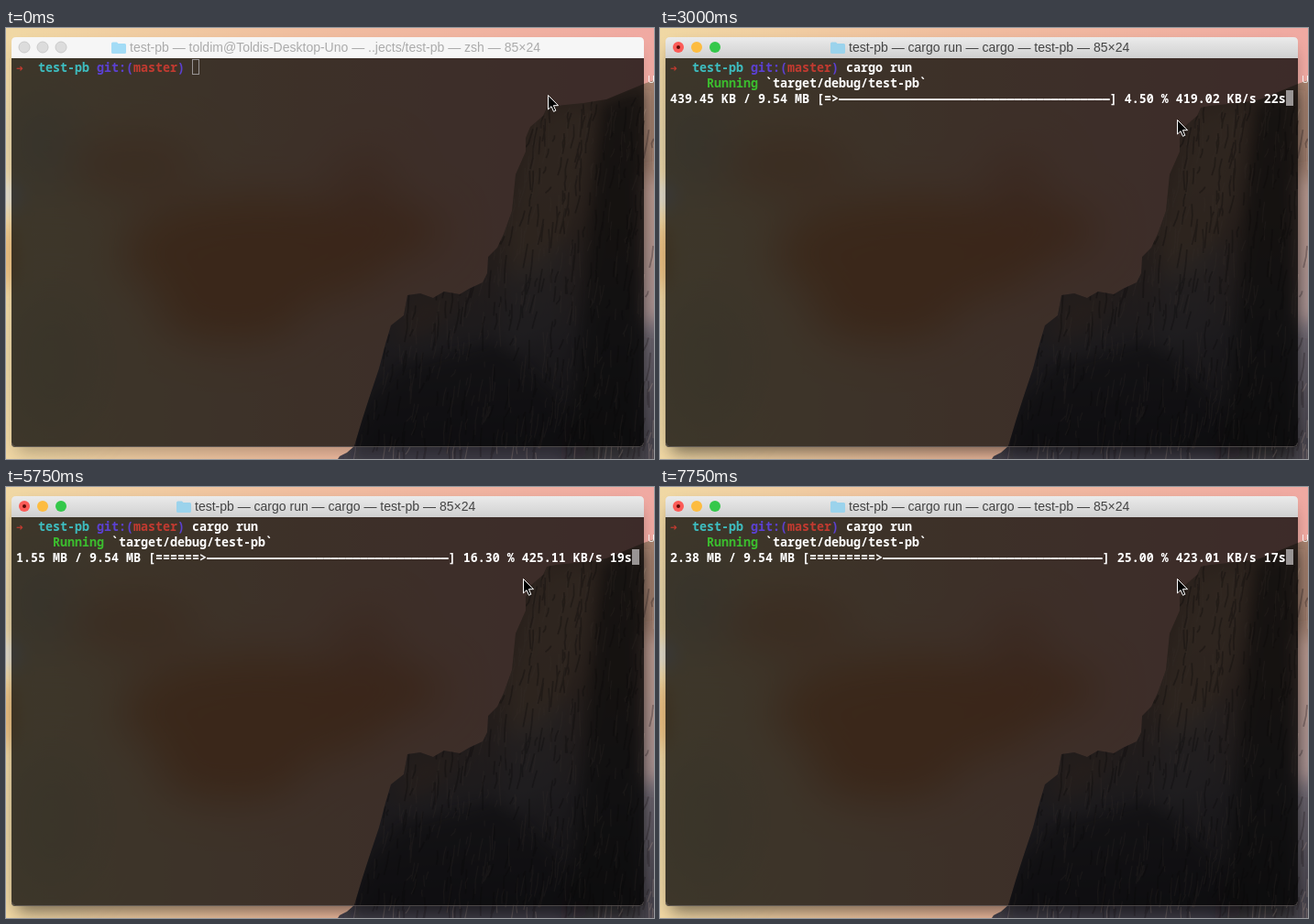
Animation, 707 px wide and 471 px high, one loop 8000 ms. Source, as an HTML page:

```html
<!DOCTYPE html>
<html lang="en">
<head>
<meta charset="utf-8">
<title>Terminal progress bar</title>
<style>
  html, body { margin: 0; width: 100%; height: 100%; overflow: hidden; }
  svg { display: block; width: 707px; height: 471px; }
  text { white-space: pre; }
  .term { font: 600 13.3333px "Noto Sans Mono", monospace; fill: #fff; }
  .term .b { font-weight: 700; }
  .title { font: 14px "Liberation Sans", sans-serif; }
</style>
</head>
<body>
<svg viewBox="0 0 707 471">
  <defs>
    <linearGradient id="sky">
      <stop offset="0" stop-color="#f0d8a4"/>
      <stop offset=".45" stop-color="#f0be9f"/>
      <stop offset="1" stop-color="#f0a9a2"/>
    </linearGradient>
    <linearGradient id="rock" gradientUnits="userSpaceOnUse" x1="560" y1="80" x2="590" y2="450">
      <stop offset="0" stop-color="#a8836f"/>
      <stop offset=".4" stop-color="#927568"/>
      <stop offset=".7" stop-color="#6f6872"/>
      <stop offset="1" stop-color="#4c4852"/>
    </linearGradient>
    <linearGradient id="bar" x2="0" y2="1">
      <stop offset="0" stop-color="#ebebeb"/>
      <stop offset="1" stop-color="#d0d0d0"/>
    </linearGradient>
    <filter id="soft" x="-50%" y="-50%" width="200%" height="200%"><feGaussianBlur stdDeviation="24"/></filter>
    <filter id="blur" x="-50%" y="-50%" width="200%" height="200%"><feGaussianBlur stdDeviation="9"/></filter>
    <path id="ridge" d="M707 57L696 61 655 78 630 82 600 85 590 87 586 96 572 108 567 120 567 135 556 160 552 200 543 225
      536 240 526 250 525 268 520 278 505 285 495 291 478 288 466 295 452 290 438 292 434 314 420 325 414 345
      407 372 396 405 388 430 380 457 372 464 364 468 362 471H707Z"/>
    <clipPath id="cliff"><use href="#ridge"/></clipPath>
    <clipPath id="outside"><path clip-rule="evenodd" d="M0 0H707V471H0ZM6 15q0-5 5-5H691q5 0 5 5V454q0 4-4 4H10q-4 0-4-4Z"/></clipPath>
  </defs>

  <!-- desktop -->
  <rect width="707" height="471" fill="url(#sky)"/>
  <g filter="url(#soft)">
    <ellipse cx="38" cy="125" rx="38" ry="55" fill="#c4c0ae" opacity=".5"/>
    <ellipse cx="50" cy="365" rx="55" ry="80" fill="#cfc3a0" opacity=".4"/>
    <g opacity=".72">
      <ellipse cx="275" cy="245" rx="150" ry="62" fill="#de8b52"/>
      <ellipse cx="245" cy="310" rx="80" ry="34" fill="#dc8750"/>
      <ellipse cx="400" cy="222" rx="80" ry="32" fill="#da854f"/>
      <ellipse cx="390" cy="165" rx="36" ry="30" fill="#df9875"/>
      <ellipse cx="140" cy="150" rx="70" ry="34" fill="#e2a276"/>
    </g>
  </g>
  <g filter="url(#blur)">
    <ellipse cx="4" cy="183" rx="14" ry="16" fill="#dcdad4"/>
    <ellipse cx="0" cy="250" rx="10" ry="36" fill="#e6b473"/>
  </g>
  <use href="#ridge" fill="url(#rock)"/>
  <g clip-path="url(#cliff)">
    <g filter="url(#blur)">
      <path d="M590 95L640 90 625 190 590 270 550 280 545 225 570 140Z" fill="#c9a286" opacity=".55"/>
      <path d="M645 85L696 66V480H610L630 300Z" fill="#2b2327" opacity=".6"/>
      <path d="M430 370L540 340 610 410 640 480H370L395 410Z" fill="#28262a" opacity=".45"/>
      <path d="M540 270L620 230 600 330 545 350Z" fill="#85828a" opacity=".45"/>
      <path d="M440 295L500 292 470 330 425 345Z" fill="#9d7c6a" opacity=".55"/>
      <path d="M700 165H720V320H700Z" fill="#c3a6a0" opacity=".8"/>
    </g>
    <g id="cracks" fill="none"></g>
  </g>
  <text x="700" y="60" font-family="Open Sans, sans-serif" font-size="11" fill="#fff">U</text>

  <!-- window -->
  <g clip-path="url(#outside)">
    <rect id="shadow" x="12" y="24" width="678" height="440" rx="6" filter="url(#blur)"/>
  </g>
  <path d="M6 33H696V454q0 4-4 4H10q-4 0-4-4Z" fill-opacity=".745"/>
  <path d="M6.5 453.500q0 4 4 4H691.500q4 0 4-4" fill="none" stroke="#8a8280" stroke-opacity=".5"/>
  <path id="titlebar" d="M6 33V15q0-5 5-5H691q5 0 5 5V33Z"/>
  <g id="lights">
    <circle cx="20" cy="21" r="6"/>
    <circle cx="40" cy="21" r="6"/>
    <circle cx="60" cy="21" r="6"/>
  </g>
  <circle id="busy" cx="20" cy="21" r="2" fill="#5c0a06"/>
  <g id="heading">
    <path id="folder" d="M-20 17q0-1.500 1.500-1.500H-14l1.500 1.500H-5.500q1.500 0 1.500 1.500V26.500q0 1.500-1.500 1.500H-18.500q-1.500 0-1.500-1.500Z"/>
    <text id="title" class="title" y="26"></text>
  </g>

  <!-- terminal -->
  <g class="term">
    <text x="11" y="47" fill="#c23a30" style="font:9.500px 'DejaVu Sans',sans-serif">➜</text>
    <text class="b" x="35" y="48" fill="#3dbdc0">test-pb</text>
    <text class="b" x="99" y="48" fill="#5b40d2">git:(<tspan fill="#c23a30">master</tspan>)</text>
    <text id="command" x="203" y="48">cargo run</text>
    <g id="output">
      <text class="b" x="51" y="65" fill="#3bbd2e">Running</text>
      <text x="115" y="65">`target/debug/test-pb`</text>
      <text id="progress" x="11" y="82"></text>
    </g>
  </g>
  <rect id="cursor"/>
  <path id="pointer" d="M0 0V15.500L3.500 12.200 6 17.800 8.300 16.800 5.900 11.200H11Z" fill="#000" stroke="#fff"/>
</svg>

<script>
const LOOP = 8000, TICK = 250;
const FOCUS = 500, TYPED = 1250, RUN = 2000;
const DASH = ' \u2014 ';
const TITLE_SHELL = ['test-pb', 'toldim@Toldis-Desktop-Uno', '..jects/test-pb', 'zsh', '85×24'].join(DASH);
const TITLE_RUN = ['test-pb', 'cargo run', 'cargo', 'test-pb', '85×24'].join(DASH);
const LIGHTS = ['#fc5b57', '#fdbc40', '#34c84a'];

// time in ms, finished thousandths, speed in KB/s
const SAMPLES = [[2000, 2, 801.71], [4250, 98, 425.12], [5750, 163, 425.11], [7250, 229, 423.55], [7750, 250, 423.01]];
const STEP_KB = 1e4 / 1024, TOTAL_KB = 1000 * STEP_KB, COLUMNS = 84;

const el = id => document.getElementById(id);
const mix = (a, b, k) => a + (b - a) * k;
const set = (node, attrs) => { for (const key in attrs) node.setAttribute(key, attrs[key]); };
const show = (id, on) => set(el(id), { visibility: on ? 'visible' : 'hidden' });
const size = kb => kb < 1024 ? kb.toFixed(2) + ' KB' : (kb / 1024).toFixed(2) + ' MB';

function progressLine(t) {
  let i = 0;
  while (i < SAMPLES.length - 2 && t > SAMPLES[i + 1][0]) i++;
  const [t0, n0, v0] = SAMPLES[i], [t1, n1, v1] = SAMPLES[i + 1];
  const k = Math.min(1, (t - t0) / (t1 - t0));
  const n = Math.round(mix(n0, n1, k));
  // the first step costs no time, so the mean speed starts high
  const pace = mix(v0 * (n0 - 1) / n0, v1 * (n1 - 1) / n1, k);
  const speed = pace * n / (n - 1);
  const done = n * STEP_KB;
  const left = `${size(done)} / ${size(TOTAL_KB)} [`;
  const right = `] ${(n / 10).toFixed(2)} % ${speed.toFixed(2)} KB/s ${Math.floor((TOTAL_KB - done) / speed)}s`;
  const width = COLUMNS - left.length - right.length;
  const filled = Math.ceil(n * width / 1000) - 1;
  return left + '='.repeat(filled) + '>' + '\u2014'.repeat(width - filled - 1) + right;
}

function drawCracks() {
  let seed = 11;
  const rnd = () => (seed = seed * 16807 % 2147483647) / 2147483647;
  let dark = '', light = '';
  for (let i = 0; i < 900; i++) {
    const x = mix(375, 707, rnd()), y = mix(75, 465, rnd()), half = mix(3, 16, rnd());
    const d = `M${x.toFixed(1)} ${y.toFixed(1)}l${mix(-3, 1, rnd()).toFixed(1)} ${half.toFixed(1)} ` +
      `${mix(-4, 1, rnd()).toFixed(1)} ${half.toFixed(1)}`;
    if (i % 2) dark += d; else light += d;
  }
  el('cracks').innerHTML =
    `<path d="${dark}" stroke="#1c1518" stroke-opacity=".3" stroke-width="1.8"/>` +
    `<path d="${light}" stroke="#d2b5a4" stroke-opacity=".22" stroke-width="1.2"/>`;
}

function draw(t) {
  const focused = t >= FOCUS, typed = t >= TYPED, running = t >= RUN;

  set(el('shadow'), { opacity: focused ? .5 : .25 });
  set(el('titlebar'), { fill: focused ? 'url(#bar)' : '#f6f6f6' });
  [...el('lights').children].forEach((light, i) => set(light, {
    fill: focused ? LIGHTS[i] : '#dcdcdc',
    stroke: focused ? 'none' : '#cacaca'
  }));
  show('busy', running);
  set(el('heading'), { transform: `translate(${running ? 206 : 135} 0)` });
  set(el('folder'), { fill: running ? '#9bd3ec' : focused ? '#6fcaf2' : '#a3dcf6' });
  set(el('title'), { fill: focused ? '#444' : '#ababab' });
  el('title').textContent = running ? TITLE_RUN : TITLE_SHELL;

  show('command', typed);
  show('output', running);
  if (running) el('progress').textContent = progressLine(t);

  const x = running ? 683 : typed ? 275 : 203, y = running ? 68 : 34;
  set(el('cursor'), focused
    ? { x, y, width: 8, height: 17, fill: '#989494', stroke: 'none' }
    : { x: x + .5, y: y + .5, width: 7, height: 16, fill: 'none', stroke: '#989494' });

  const rest = (1 - Math.min(1, t / FOCUS)) ** 2;
  set(el('pointer'), { transform: `translate(${mix(564.5, 591.5, rest)} ${mix(100.5, 73.5, rest)})` });
}

function frame() {
  draw(Math.floor(performance.now() % LOOP / TICK) * TICK);
  requestAnimationFrame(frame);
}

drawCracks();
frame();
</script>
</body>
</html>
```
